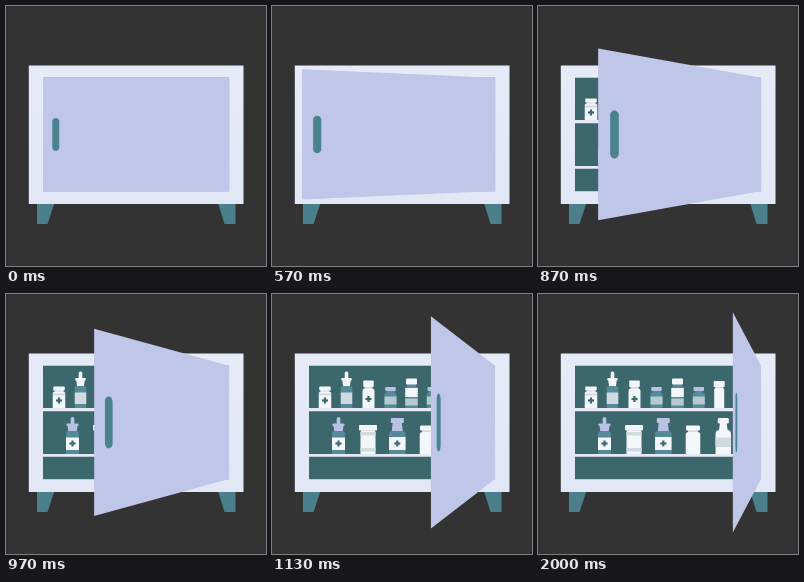
Recreate the animation shown at these times as an HTML page. Size 260 by 260 pixels, loop 4010 ms.

```html
<!DOCTYPE html>
<html lang="en">
<head>
<meta charset="utf-8">
<title>Medicine cabinet</title>
<style>
  html, body { margin: 0; width: 100%; height: 100%; overflow: hidden; background: #333; }
  svg { display: block; width: 100vw; height: 100vh; }
</style>
</head>
<body>
<svg viewBox="0 0 260 260">
  <defs>
    <linearGradient id="shell" x1="0" y1="0" x2="0" y2="1">
      <stop offset="0" stop-color="#e7ebf8"/>
      <stop offset="1" stop-color="#e1e7f5"/>
    </linearGradient>
  </defs>
  <rect width="260" height="260" fill="#333"/>
  <path d="M31 197H48.500L41.500 218H31ZM229.500 197H212L218.500 218H229.500Z" fill="#4a7f8b"/>
  <rect x="22.800" y="59.500" width="214.700" height="138.500" fill="url(#shell)"/>
  <rect x="37" y="71.700" width="186" height="113.500" fill="#3c676c"/>
  <g id="stock"></g>
  <path d="M36.500 114H224V117.300H36.500ZM36.500 160H224V162.800H36.500Z" fill="#e6eaf7"/>
  <path id="door" fill="#c0c6e7"/>
  <path id="handle" fill="#4a828d"/>
</svg>
<script>
const LOOP = 4010, OPEN_AT = 400, STEPS = 24, STEP_MS = 100 / 3, MAX_ANGLE = 71.3 * Math.PI / 180;
const HINGE = 223, WIDTH = 186, TOP = 71.7, BOTTOM = 185, CX = 130, CY = 128.3, DEPTH = 363;
const WHITE = '#f3f6fa', LILAC = '#b9c1e4', GLASS = '#578a98', TEAL = '#3c6b72', SHADE = '#cfdbe1', PALE = '#b4c9d0';

const stock = document.getElementById('stock');
const door = document.getElementById('door');
const handle = document.getElementById('handle');

function box(cx, y, w, h, fill, r = 0) {
  return `<rect x="${cx - w / 2}" y="${y}" width="${w}" height="${h}" rx="${r}" fill="${fill}"/>`;
}
function taper(cx, y, topW, h, bottomW, fill) {
  return `<path d="M${cx - topW / 2} ${y}h${topW}L${cx + bottomW / 2} ${y + h}h${-bottomW}Z" fill="${fill}"/>`;
}
function cross(cx, cy) {
  return box(cx, cy - 3, 2.2, 6, TEAL) + box(cx, cy - 1.1, 6, 2.2, TEAL);
}
// Body with rounded shoulders standing on a shelf.
function body(cx, base, w, top, fill, r = 2.5) {
  return `<path d="M${cx - w / 2} ${base}V${top + r}q0 ${-r} ${r} ${-r}h${w - 2 * r}q${r} 0 ${r} ${r}V${base}Z" fill="${fill}"/>`;
}
function cap(cx, y, w, h, fill, neckW, neckH, neckFill = SHADE) {
  return box(cx, y + h - 0.5, neckW, neckH + 1, neckFill) + box(cx, y, w, h, fill, 0.8);
}
function dropper(cx, base, w, top, color, tip) {
  return body(cx, base, w, top, GLASS) + box(cx, tip, 3.6, 8, color, 1.6) +
    box(cx, tip + 6.5, w - 1, 2.5, color, 0.8) + taper(cx, tip + 8.5, w - 3, top - tip - 8.5, w - 4.5, color);
}
function smallJar(cx) {
  return cap(cx, 93, 10.5, 4, LILAC, 8, 2, GLASS) + body(cx, 114, 12, 98.5, GLASS, 2) +
    box(cx, 102.5, 12, 8, PALE);
}

stock.innerHTML = [
  cap(53, 92.5, 11.5, 4, WHITE, 9, 1.5), body(53, 114, 12.5, 97.5, WHITE, 2), box(53, 99.5, 12, 2, SHADE), cross(53, 106.5),
  dropper(74.5, 114, 11.5, 92, WHITE, 77.5), box(74.5, 98.5, 11.5, 11.5, SHADE),
  cap(96.5, 86.5, 10.5, 6.5, WHITE, 8, 2), body(96.5, 114, 12, 94.5, WHITE), cross(96.5, 105),
  smallJar(118.5),
  cap(139.5, 84.5, 11, 6, WHITE, 9, 2.5, GLASS), body(139.5, 114, 12.5, 92.5, GLASS, 2),
  box(139.5, 94, 12.5, 9, WHITE), box(139.5, 104.5, 12.5, 7, PALE),
  smallJar(160.8),
  cap(181.2, 87, 11, 6, WHITE, 8, 2), body(181.2, 114, 10, 94, WHITE, 1.5),
  dropper(66.5, 160, 13, 137, LILAC, 123), box(66.5, 143.5, 13, 12.5, WHITE), cross(66.5, 149.5),
  cap(96, 131, 18, 5.5, WHITE, 14, 1.5), body(96, 160, 15, 137, WHITE, 1),
  box(96, 138, 15, 3.5, SHADE), box(96, 154, 15, 3.5, SHADE),
  taper(125.3, 128, 9, 9, 11, LILAC), box(125.3, 124, 13, 5, LILAC, 1), body(125.3, 160, 16.5, 137, GLASS, 3),
  box(125.3, 143, 16.5, 13, WHITE), cross(125.3, 149.5),
  cap(155, 131.5, 14, 5, WHITE, 10, 2), body(155, 160, 14.5, 138, WHITE),
  taper(185.3, 129, 6.5, 8, 9, WHITE), box(185.3, 124, 11, 5.5, WHITE, 1.2), body(185.3, 160, 15.5, 136, WHITE, 4),
  box(185.3, 143.5, 15.5, 9.5, SHADE)
].join('');

// Projects a point on the closed door after turning it about the hinge.
function project(x, y, angle) {
  const reach = HINGE - x;
  const scale = 1 / (1 - reach * Math.sin(angle) / DEPTH);
  return [CX + (HINGE - reach * Math.cos(angle) - CX) * scale, CY + (y - CY) * scale];
}
function outline(points, angle) {
  return 'M' + points.map(([x, y]) => project(x, y, angle).map(v => v.toFixed(2)).join(' ')).join('L') + 'Z';
}

const doorPoints = [[HINGE - WIDTH, TOP], [HINGE + 0.5, TOP], [HINGE + 0.5, BOTTOM], [HINGE - WIDTH, BOTTOM]];
const handlePoints = Array.from({ length: 32 }, (_, i) => {
  const a = (i + 0.5) / 32 * Math.PI * 2;
  return [49.8 + 3.5 * Math.cos(a), 128.4 + 3.5 * Math.sin(a) + 12.9 * Math.sign(Math.sin(a))];
});

function draw(t) {
  const elapsed = Math.floor((t - OPEN_AT) / 10) * 10 + 4;
  const step = Math.min(STEPS, Math.max(0, Math.floor(elapsed / STEP_MS)));
  const angle = MAX_ANGLE * step / STEPS;
  door.setAttribute('d', outline(doorPoints, angle));
  handle.setAttribute('d', outline(handlePoints, angle));
}

const start = performance.now();
function tick() {
  draw((performance.now() - start) % LOOP);
  requestAnimationFrame(tick);
}
tick();
</script>
</body>
</html>
```
